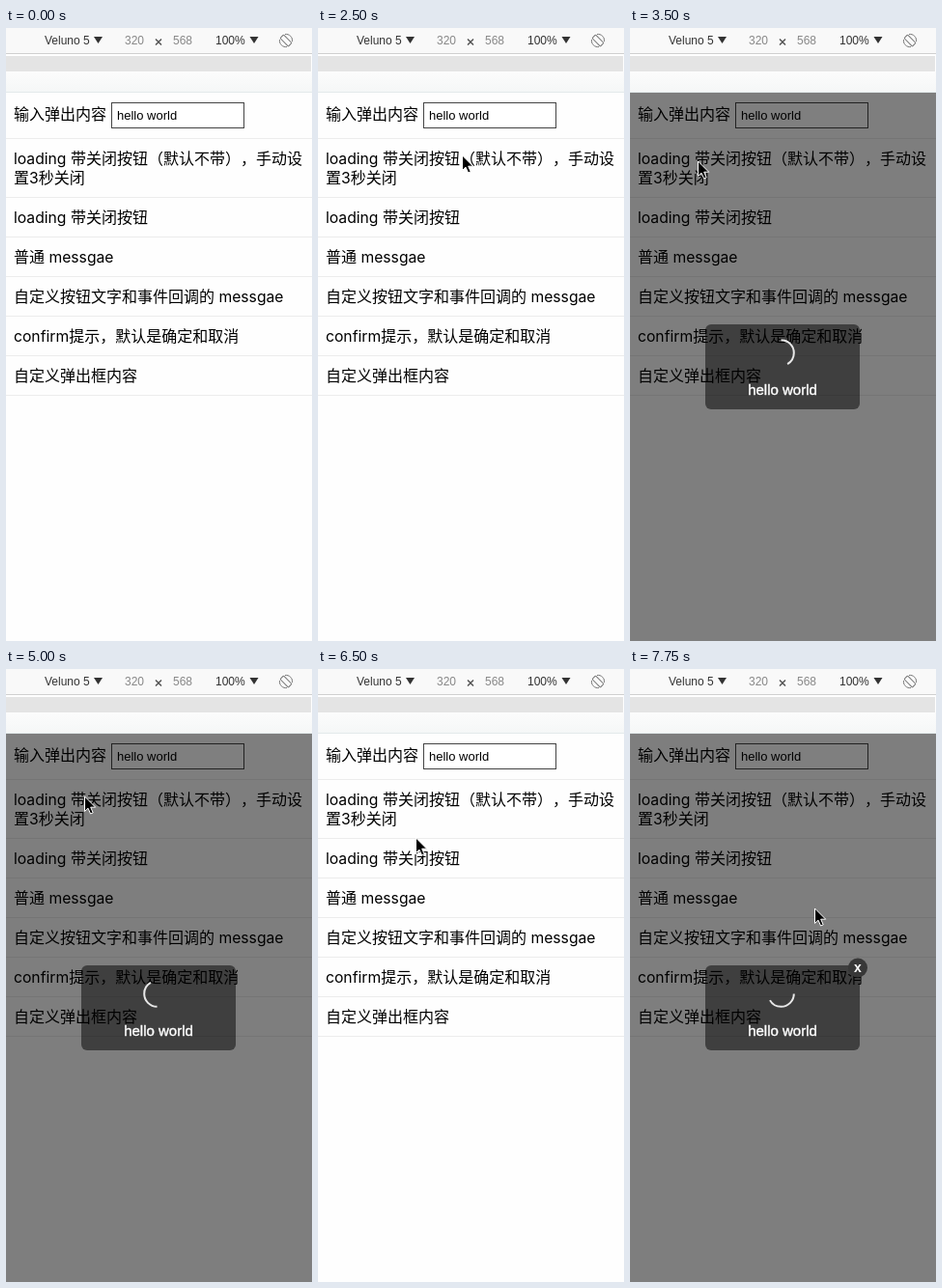
An HTML page that plays this animation: 317 by 635 pixels, repeating every 8 s.

```html
<!DOCTYPE html>
<html lang="zh-CN">
<meta charset="utf-8">
<style>
  html, body { margin: 0; width: 100%; height: 100%; overflow: hidden; background: #fefefe; }
  svg { display: block; }
  text { font-family: "Liberation Sans", Arial, sans-serif; white-space: pre; }
  #rows text { font: 16px "Noto Sans CJK SC", "Noto Sans CJK", sans-serif; text-spacing-trim: space-all; }
  #rows tspan { font: 15.7px Inter, sans-serif; }
</style>
<svg width="317" height="635" viewBox="0 0 317 635">
  <linearGradient id="fade" x2="0" y2="1">
    <stop stop-color="#fcfcfc"/><stop offset="1" stop-color="#f5f7f7"/>
  </linearGradient>
  <rect width="317" height="635" fill="#fefefe"/>

  <g id="toolbar" font-size="12" fill="#333">
    <rect width="317" height="26" fill="#f9f9f9"/>
    <rect y="26" width="317" height="1" fill="#cfcfcf"/>
    <rect y="29" width="316" height="16" fill="#e4e4e4"/>
    <rect y="45" width="317" height="21" fill="url(#fade)"/>
    <rect y="66" width="317" height="1" fill="#e3eaeb"/>
    <text x="40" y="17">Veluno 5</text>
    <text x="217" y="17">100%</text>
    <g fill="#888"><text x="123" y="17">320</text><text x="173" y="17">568</text></g>
    <path id="arrow" d="M91 9h9l-4.500 7z"/>
    <use href="#arrow" x="161.500"/>
    <path d="M155 11.500l6 6m0-6l-6 6" stroke="#555" stroke-width="1.500"/>
    <g fill="none" stroke="#777" transform="translate(290 13)">
      <rect x="-2.500" y="-6" width="5" height="12" rx="1" transform="rotate(-45)"/>
      <path d="M-1-6.500A6.500 6.500 0 0 1 6.500 1M1 6.500A6.500 6.500 0 0 1-6.500-1"/>
    </g>
  </g>

  <g id="rows">
    <text x="8" y="95">输入弹出内容</text>
    <path d="M0 114.500h317" stroke="#ececec"/>
  </g>
  <rect x="109.500" y="77.500" width="137" height="26" fill="#fff" stroke="#444"/>
  <text x="115" y="95" font-size="13">hello world</text>

  <g id="overlay">
    <rect y="67" width="317" height="568" opacity=".5"/>
    <rect x="78" y="307" width="160" height="88" rx="6" opacity=".5"/>
    <circle id="spinner" r="13.300" fill="none" stroke="#e8e8e8" stroke-width="2" pathLength="360" stroke-dasharray="150 210"/>
    <text x="158" y="380" font-size="15" text-anchor="middle" fill="#fff" stroke="#fff" stroke-width=".4">hello world</text>
    <g id="close">
      <circle cx="236" cy="309.500" r="10" fill="#383838"/>
      <text x="236" y="314" font-size="14" font-weight="bold" text-anchor="middle" fill="#fff">x</text>
    </g>
  </g>

  <path id="cursor" d="M.5 0V15.500L4 12.200 6.600 18 9.200 16.900 6.700 11.200H11.700Z" stroke="#fff"/>
</svg>
<script>
  const STEP = 250, LOOP = 8000;
  const OPEN = 3500, SHUT = 6500, REOPEN = 7500;
  const $ = id => document.getElementById(id);

  const rows = [
    ["loading 带关闭按钮（默认不带），手动设", "置3秒关闭"],
    ["loading 带关闭按钮"],
    ["普通 messgae"],
    ["自定义按钮文字和事件回调的 messgae"],
    ["confirm提示，默认是确定和取消"],
    ["自定义弹出框内容"]
  ];
  let top_ = 115, markup = "";
  for (const lines of rows) {
    lines.forEach((line, i) => {
      const text = line.replace(/[ -~]+/g, "<tspan>$&</tspan>");
      markup += `<text x="8" y="${top_ + 26 + 20 * i}">${text}</text>`;
    });
    top_ += 21 + 20 * lines.length;
    markup += `<path d="M0 ${top_ - 0.5}h317" stroke="#ececec"/>`;
  }
  $("rows").innerHTML += markup;

  // Pointer gestures: start and end time, then where the tip comes to rest
  const entry = [306, 77];
  const moves = [
    [500, 1000, 201, 94],
    [1000, 1750, 164, 131],
    [2250, 3250, 70, 138],
    [4000, 4750, 81, 132],
    [5250, 6250, 103, 172],
    [6250, 7250, 91, 194],
    [7250, 7750, 191, 248]
  ];

  function pointer(t) {
    let [x, y] = entry;
    for (const [from, to, toX, toY] of moves) {
      const k = Math.min(1, Math.max(0, (t - from) / (to - from)));
      const eased = k * k * (3 - 2 * k);
      x += (toX - x) * eased;
      y += (toY - y) * eased;
    }
    return [Math.round(x), Math.round(y)];
  }

  const show = (id, on) => $(id).setAttribute("display", on ? "inline" : "none");
  const place = (id, value) => $(id).setAttribute("transform", value);

  function draw(now) {
    const t = Math.floor(now % LOOP / STEP) * STEP;
    show("overlay", t >= OPEN && t < SHUT || t >= REOPEN);
    show("close", t >= REOPEN);
    show("cursor", t >= moves[0][0]);
    place("spinner", `translate(156.5 336.5) rotate(${(t - OPEN) * 0.36 - 90})`);
    place("cursor", `translate(${pointer(t)})`);
  }

  const start = performance.now();
  function tick() {
    draw(performance.now() - start);
    requestAnimationFrame(tick);
  }
  tick();
</script>
</html>
```
